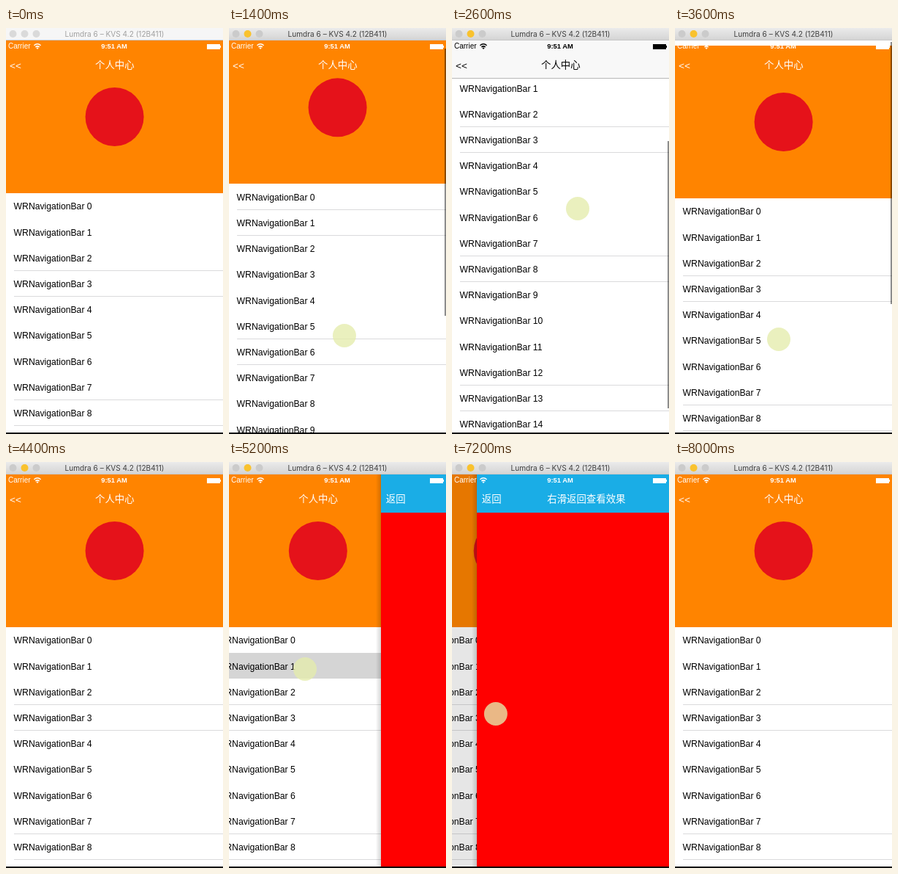
Animation of 297x553 px, one loop 9400 ms. Source, as an HTML page:

```html
<!DOCTYPE html>
<html lang="zh-CN">
<head>
<meta charset="utf-8">
<title>Navigation bar demo</title>
<style>
  html, body { margin: 0; width: 100%; height: 100%; overflow: hidden; background: #fff; }
  svg { display: block; width: 100vw; height: 100vh; }
  rect { shape-rendering: crispEdges; }
  text { font-family: "Liberation Sans", Arial, sans-serif; white-space: pre; }
  .row { font-size: 12.2px; }
  .cjk { font: 400 13.4px "Noto Sans CJK SC", "Noto Sans CJK", sans-serif; }
  .back { font-size: 13.5px; }
  .mid { text-anchor: middle; }
  #windowTitle { font: 10.1px Inter, sans-serif; }
</style>
</head>
<body>
<svg viewBox="0 0 297 553" preserveAspectRatio="none">
  <defs>
    <linearGradient id="chrome" x2="0" y2="1">
      <stop stop-color="#ebebeb"/><stop offset="1" stop-color="#d3d3d3"/>
    </linearGradient>
    <linearGradient id="edge">
      <stop stop-opacity="0"/><stop offset="1" stop-opacity=".16"/>
    </linearGradient>
  </defs>
  <rect width="297" height="553" fill="#fff"/>

  <g id="home">
    <g id="content">
      <rect y="17" width="297" height="208" fill="#ff8400"/>
      <circle cx="148.6" cy="121" r="40" fill="#e5121a"/>
      <g id="rows"></g>
    </g>
    <g id="navBack">
      <rect y="17" width="297" height="51" fill="#f8f8f8"/>
      <rect y="68" width="297" height="1" fill="#b8b8b8"/>
    </g>
    <g id="navText">
      <text class="back" x="5" y="56">&lt;&lt;</text>
      <text class="cjk mid" x="148.8" y="55.3">个人中心</text>
    </g>
    <rect id="indicator" x="294.5" width="2" fill="#000" fill-opacity=".45"/>
  </g>
  <rect id="dim" width="297" height="553"/>

  <g id="detail">
    <rect x="-7" y="17" width="7" height="536" fill="url(#edge)"/>
    <rect y="17" width="297" height="536" fill="#f00"/>
    <rect y="17" width="297" height="52" fill="#1aade6"/>
    <g fill="#fff">
      <text class="cjk" x="7" y="55.2">返回</text>
      <text class="cjk mid" x="150" y="55.2">右滑返回查看效果</text>
    </g>
  </g>

  <g id="status">
    <text x="3" y="28.4" font-size="10">Carrier</text>
    <text class="mid" x="148" y="28.3" font-size="9.4" font-weight="bold">9:51 AM</text>
    <path d="M38.4 23.7Q43 19.7 47.6 23.7M40.3 26Q43 23.7 45.7 26" fill="none" stroke="currentColor" stroke-width="1.5"/>
    <path d="M41.4 27.2Q43 26 44.6 27.2L43 29Z"/>
    <rect x="275" y="22" width="18" height="7" rx="1"/>
    <rect x="293" y="24" width="1" height="3"/>
  </g>

  <circle id="touch" r="16" fill="rgba(228,236,172,.78)"/>

  <rect id="windowBar" width="297" height="17"/>
  <rect y="16" width="297" height="1" fill="#c8c8c8"/>
  <g id="lights"><circle cx="9.5" cy="8" r="5"/><circle cx="25.5" cy="8" r="5"/><circle cx="41.5" cy="8" r="5"/></g>
  <text id="windowTitle" class="mid" x="148.5" y="12">Lumdra 6 – KVS 4.2 (12B411)</text>
  <rect y="551" width="297" height="2" fill="#080808"/>
</svg>

<script>
const LOOP = 9400, STEP = 200, WIDTH = 297;
const ROW_TOP = 225, ROW_HEIGHT = 35.2;
const $ = id => document.getElementById(id);
const set = (id, attrs) => {
  for (const name in attrs) $(id).setAttribute(name, attrs[name]);
};
const clamp = v => Math.min(1, Math.max(0, v));
const within = (t, from, to) => t >= from && t <= to;

// Smooth 0 to 1 progress between two times.
function ease(t, from, to) {
  const p = clamp((t - from) / (to - from));
  return p * p * (3 - 2 * p);
}

$('rows').innerHTML = Array.from({ length: 18 }, (_, i) => {
  const y = ROW_TOP + i * ROW_HEIGHT;
  return `<rect id="row${i}" y="${y}" width="297" height="${ROW_HEIGHT}" fill="#fff"/>
    <text class="row" x="10.6" y="${y + 22.4}">WRNavigationBar ${i}</text>
    <rect x="11" y="${y + ROW_HEIGHT - 0.4}" width="286" height="1" fill="#dadadc"/>`;
}).join('');

function touchPoint(t, dragUp, dragDown, pageX) {
  if (within(t, 1200, 3600)) {
    return [157 + 15 * dragUp - 30 * dragDown, 431 - 185 * dragUp + 178 * dragDown];
  }
  if (within(t, 4800, 5200)) return [104, 282];
  if (within(t, 6800, 7600)) return [pageX + 26, 343];
  return null;
}

function draw(t) {
  const dragUp = ease(t, 1180, 2600), dragDown = ease(t, 2600, 3600);
  const scroll = 196 * dragUp - 203 * dragDown + 7 * ease(t, 3600, 4000);

  const push = ease(t, 5000, 5550), pop = ease(t, 6987, 8000);
  const covered = push - pop;
  const pageX = WIDTH * (1 - covered);

  const faded = scroll > 104;
  const navAlpha = clamp((scroll - 104) / 51);
  const ink = faded ? '#000' : '#fff';
  set('content', { transform: `translate(0 ${-scroll})` });
  set('navBack', { opacity: navAlpha });
  set('navText', { fill: ink, opacity: faded ? navAlpha : 1 });
  set('status', { fill: ink, color: ink });
  set('indicator', {
    y: 19 + Math.max(0, scroll) * 0.687,
    height: 364 + Math.min(0, scroll),
    opacity: within(t, 1200, 4000) ? 1 : 0
  });
  set('row1', { fill: within(t, 4800, 5400) ? '#d5d5d5' : '#fff' });

  set('home', { transform: `translate(${-covered * WIDTH * 0.3} 0)` });
  set('dim', { opacity: push === 1 ? covered * 0.11 : 0 });
  set('detail', { transform: `translate(${pageX} 0)`, visibility: covered > 0 ? 'visible' : 'hidden' });

  const touch = touchPoint(t, dragUp, dragDown, pageX);
  set('touch', { visibility: touch ? 'visible' : 'hidden' });
  if (touch) set('touch', { cx: touch[0], cy: touch[1] });

  const active = t >= 400;
  set('windowBar', { fill: active ? 'url(#chrome)' : '#f6f6f6' });
  set('windowTitle', { fill: active ? '#404040' : '#a0a0a0' });
  set('lights', { fill: active ? '#cbcbcb' : '#dadada' });
  $('lights').children[1].setAttribute('fill', active ? '#f9c22e' : '#dadada');
}

const start = performance.now();
function tick() {
  const t = (performance.now() - start) % LOOP;
  draw(Math.floor(t / STEP) * STEP);
  requestAnimationFrame(tick);
}
tick();
</script>
</body>
</html>
```
